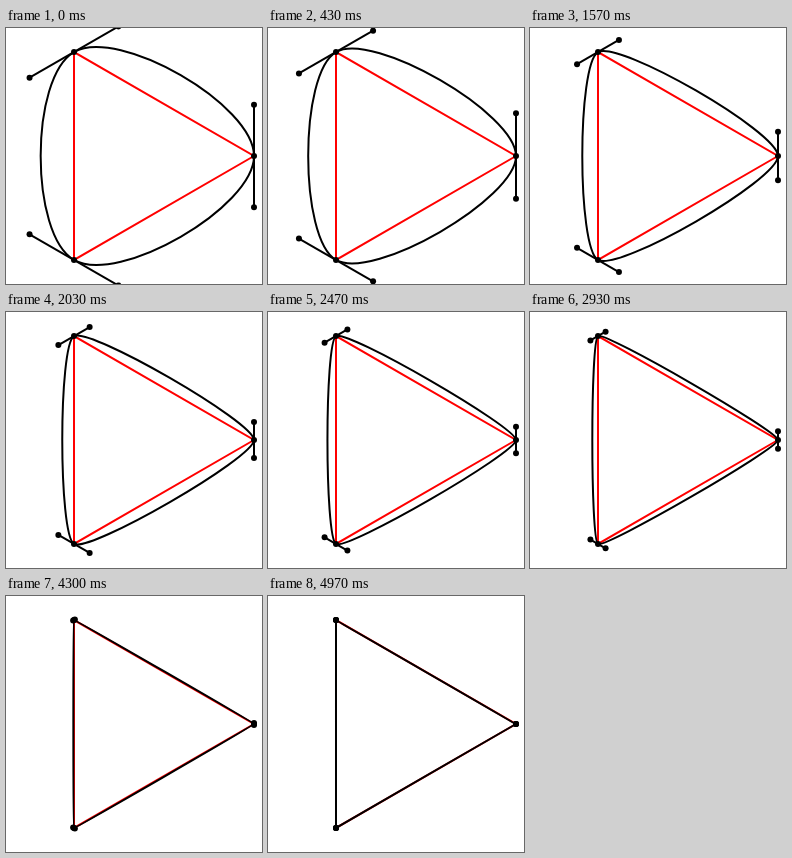
Write an HTML page with a canvas that moves like this. It is 256 px wide and 256 px high and loops after 5010 ms.

```html
<!DOCTYPE html>
<html>
<head>
<meta charset="utf-8">
<title>Bézier triangle</title>
<style>
  html, body { margin: 0; width: 100%; height: 100%; overflow: hidden; background: #fff; }
  canvas { display: block; width: 256px; height: 256px; }
</style>
</head>
<body>
<canvas id="stage" width="256" height="256"></canvas>
<script>
const ctx = document.getElementById('stage').getContext('2d');
const LOOP = 5010, STEPS = 150, CENTER = 128, RADIUS = 120, REACH = 51.32;

// Each vertex with its unit tangent along the circumscribed circle.
const corners = [0, 1, 2].map(k => {
  const a = k * 2 * Math.PI / 3;
  return {
    x: CENTER + RADIUS * Math.cos(a),
    y: CENTER + RADIUS * Math.sin(a),
    tx: -Math.sin(a),
    ty: Math.cos(a)
  };
});

const along = (c, d) => [c.x + c.tx * d, c.y + c.ty * d];

function dot(x, y) {
  ctx.beginPath();
  ctx.arc(x, y, 3, 0, 2 * Math.PI);
  ctx.fill();
}

function draw(ms) {
  const step = Math.min(STEPS - 1, Math.floor((ms + 4) * 0.03));
  const len = REACH * (1 - step / STEPS) ** 2;

  ctx.fillStyle = '#fff';
  ctx.fillRect(0, 0, 256, 256);
  ctx.lineWidth = 2;
  ctx.fillStyle = '#000';

  ctx.strokeStyle = '#f00';
  ctx.beginPath();
  corners.forEach(c => ctx.lineTo(c.x, c.y));
  ctx.closePath();
  ctx.stroke();

  ctx.strokeStyle = '#000';
  ctx.beginPath();
  ctx.moveTo(corners[0].x, corners[0].y);
  corners.forEach((c, k) => {
    const n = corners[(k + 1) % 3];
    ctx.bezierCurveTo(...along(c, len), ...along(n, -len), n.x, n.y);
  });
  ctx.closePath();
  ctx.stroke();

  for (const c of corners) {
    const from = along(c, -len), to = along(c, len);
    ctx.beginPath();
    ctx.moveTo(...from);
    ctx.lineTo(...to);
    ctx.stroke();
    dot(...from);
    dot(...to);
    dot(c.x, c.y);
  }
}

const start = performance.now();
function tick() {
  draw((performance.now() - start) % LOOP);
  requestAnimationFrame(tick);
}
tick();
</script>
</body>
</html>
```
